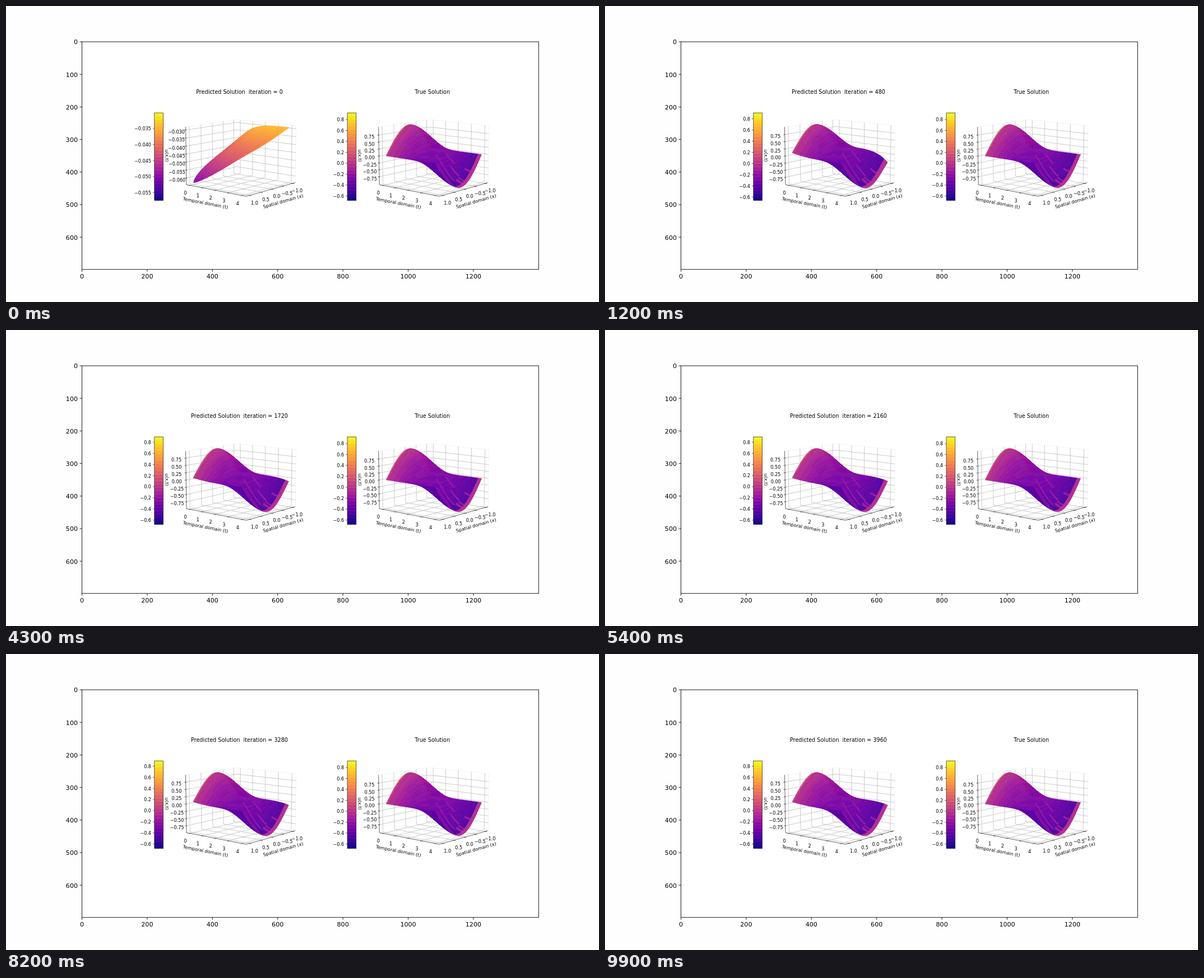
These frames come from a looping animation (1058 px wide and 529 px high, 10000 ms). An HTML page with a canvas:

```html
<!DOCTYPE html>
<html lang="en">
<head>
<meta charset="utf-8">
<title>Predicted and true solution</title>
<style>
  html, body { margin: 0; width: 100%; height: 100%; overflow: hidden; background: #fefefe; }
  canvas { display: block; width: 1058px; height: 529px; }
</style>
</head>
<body>
<canvas id="stage"></canvas>
<script>
const W = 1058, H = 529, FRAMES = 100, STEP_MS = 100, N = 48;
const canvas = document.getElementById('stage');
const ctx = canvas.getContext('2d');
const dpr = window.devicePixelRatio || 1;
canvas.width = W * dpr;
canvas.height = H * dpr;
ctx.scale(dpr, dpr);

const clamp = (v, a = 0, b = 1) => Math.min(b, Math.max(a, v));
const lerp = (a, b, k) => a + (b - a) * k;
const hash = (a, b) => { const v = Math.sin(a * 12.9898 + b * 78.233) * 43758.5453; return v - Math.floor(v); };

const plasmaStops = ['0d0887', '46039f', '7201a8', '9c179e', 'bd3786', 'd8576b', 'ed7953', 'fb9f3a', 'fdca26', 'f0f921']
  .map(h => [0, 2, 4].map(i => parseInt(h.slice(i, i + 2), 16)));
function plasma(v) {
  const p = clamp(v) * 9, i = Math.min(8, Math.floor(p));
  return `rgb(${plasmaStops[i].map((c, k) => Math.round(lerp(c, plasmaStops[i + 1][k], p - i)))})`;
}

// Perspective camera: s runs along time, q along space (1 to -1), f is height; all 0..1 inside the box.
const rad = Math.PI / 180, L = 1.143, ZL = 0.857, FOCAL = 1214, DIST = 10;
const ca = Math.cos(40 * rad), sa = Math.sin(40 * rad), ce = Math.cos(10 * rad), se = Math.sin(10 * rad);
function project(s, q, f) {
  const a = (s - 0.5) * L, b = (q - 0.5) * L, z = (f - 0.5) * ZL;
  const h = a * ca + b * sa, d = a * sa - b * ca;
  const k = FOCAL / (DIST - d * ce - z * se);
  return [419.7 + h * k, 266.6 - (z * ce - d * se) * k];
}
const INSET = 0.064;
const inset = v => INSET + v * (1 - 2 * INSET);

function line(points, color, width) {
  ctx.beginPath();
  points.forEach(([x, y]) => ctx.lineTo(x, y));
  ctx.strokeStyle = color;
  ctx.lineWidth = width;
  ctx.stroke();
}
function label(text, x, y, size, align = 'center', angle = 0) {
  ctx.save();
  ctx.translate(x, y);
  ctx.rotate(angle * rad);
  ctx.font = `${size}px "DejaVu Sans", sans-serif`;
  ctx.textAlign = align;
  ctx.fillStyle = '#000';
  ctx.fillText(text, 0, size * 0.365);
  ctx.restore();
}

function ticks(lo, hi) {
  const range = hi - lo, mag = 10 ** Math.floor(Math.log10(range / 9));
  const step = [1, 2, 2.5, 5, 10].map(m => m * mag).find(v => range / v <= 9);
  let digits = 0;
  while (Math.abs(step * 10 ** digits - Math.round(step * 10 ** digits)) > 1e-6) digits++;
  const list = [];
  for (let k = Math.ceil(lo / step); k * step <= hi; k++) {
    const v = k * step;
    list.push({ v, text: (v < 0 ? '−' : '') + Math.abs(v).toFixed(digits) });
  }
  return list;
}

const wave = (s, q) => 0.5 + 0.48 * Math.cos(Math.PI * s) * Math.sin(Math.PI * q);
function untrained(s, q) {
  const near = 0.03 + 0.63 * s ** 1.2;
  const far = 0.6 + 0.37 * (1 - (1 - s) ** 4);
  return lerp(near, far, q ** (0.6 + 0.7 * s));
}

const toneStops = [[0, 0.42], [0.12, 0.4], [0.3, 0.31], [0.5, 0.25], [0.75, 0.18], [1, 0.14]];
function waveTone(s, q, i, j) {
  if (i === 0) return 0.44 + 0.2 * Math.sin(Math.PI * q);
  if (s > 0.94) return q > 0.42 ? 0.4 : 0.28;
  const k = toneStops.findIndex(p => p[0] >= s), [s0, c0] = toneStops[k - 1], [s1, c1] = toneStops[k];
  let c = lerp(c0, c1, (s - s0) / (s1 - s0));
  if (s > 0.5 && q > 0.2 && q < 0.55) c -= 0.05 * (s - 0.5) * 2;
  if (s > 0.5 && q > 0.2 && hash(j, i >> 3) > 0.93) return 0.33;
  return c + (hash(i, Math.floor(j / 9)) - 0.5) * 0.045;
}

function surface(height, tone) {
  const grid = [];
  for (let j = 0; j <= N; j++) {
    grid.push([]);
    for (let i = 0; i <= N; i++) {
      const s = i / N, q = j / N;
      grid[j].push(project(inset(s), inset(q), height(s, q)));
    }
  }
  ctx.lineWidth = 0.5;
  for (let j = N - 1; j >= 0; j--) for (let i = 0; i < N; i++) {
    ctx.beginPath();
    for (const [x, y] of [grid[j][i], grid[j][i + 1], grid[j + 1][i + 1], grid[j + 1][i]]) ctx.lineTo(x, y);
    ctx.closePath();
    ctx.fillStyle = ctx.strokeStyle = plasma(tone((i + 0.5) / N, (j + 0.5) / N, i, j));
    ctx.fill();
    ctx.stroke();
  }
}

function box(zlo, zhi) {
  const GRID = '#c4c4c4', INK = '#222', SIZE = 8.08;
  const seg = (a, b, color = GRID, width = 0.9) => line([project(...a), project(...b)], color, width);
  const edge = (a, b) => seg(a, b, '#ececec', 0.6);
  edge([0, 0, 1], [0, 1, 1]);
  edge([0, 1, 1], [1, 1, 1]);
  edge([1, 1, 0], [1, 1, 1]);

  for (let k = 0; k <= 4; k++) {
    const p = inset(k / 4);
    line([project(p, 0, 0), project(p, 1, 0), project(p, 1, 1)], GRID, 0.9);
    line([project(1, p, 0), project(0, p, 0), project(0, p, 1)], GRID, 0.9);
  }
  const pad = (zhi - zlo) / 50;
  const zTicks = ticks(zlo + pad, zhi - pad).map(t => ({ ...t, f: (t.v - zlo) / (zhi - zlo) }));
  for (const { f } of zTicks) line([project(0, 0, f), project(0, 1, f), project(1, 1, f)], GRID, 0.9);

  line([project(0, 0, 1), project(0, 0, 0), project(1, 0, 0), project(1, 1, 0)], INK, 0.7);
  for (let k = 0; k <= 4; k++) {
    const p = inset(k / 4);
    seg([p, 0.012, 0], [p, -0.024, 0], INK, 0.7);
    seg([0.988, p, 0], [1.024, p, 0], INK, 0.7);
    const [tx, ty] = project(p, 0, 0), [xx, xy] = project(1, p, 0);
    label(String(k), tx - 8.3, ty + 14, SIZE);
    const x = 1 - k / 2;
    label((x < 0 ? '−' : '') + Math.abs(x).toFixed(1), xx + 8.5, xy + 13.2, SIZE);
  }
  for (const { f, text } of zTicks) {
    const [x, y] = project(0, 0, f);
    line([[x - 2.4, y + 0.4], [x + 1.2, y - 0.2]], INK, 0.7);
    label(text, x - 16.6, y + 3.4, SIZE);
  }
  label('Temporal domain (t)', 356, 352, SIZE, 'center', 11);
  label('Spatial domain (x)', 494.5, 348.8, SIZE, 'center', -16);
  label('u(x,t)', 287.4, 267.5, SIZE, 'center', 89.4);
}

function colorbar(lo, hi) {
  const x = 264.8, y = 191, w = 15.8, h = 156.6, bands = 26;
  for (let k = 0; k < bands; k++) {
    const top = y + h * (1 - (k + 1) / bands);
    ctx.fillStyle = plasma((k + 0.5) / bands);
    ctx.fillRect(x, top, w, h / bands + (k ? 0.4 : 0));
  }
  ctx.strokeStyle = '#222';
  ctx.lineWidth = 0.7;
  ctx.strokeRect(x, y, w, h);
  for (const { v, text } of ticks(lo, hi)) {
    const ty = y + h * (hi - v) / (hi - lo);
    line([[x - 2.8, ty], [x, ty]], '#222', 0.7);
    label(text, x - 5.8, ty + 0.4, 8.08, 'right');
  }
}

function panel(dx, title, zlim, clim, height, tone) {
  ctx.save();
  ctx.translate(dx, 0);
  label(title, 416.5, 153.2, 9.65);
  colorbar(...clim);
  box(...zlim);
  surface(height, tone);
  ctx.restore();
}

function outerAxes() {
  const x0 = 135.5, y0 = 64, unit = 0.582, INK = '#000';
  ctx.fillStyle = '#fff';
  ctx.fillRect(x0, y0, 815, 407);
  ctx.strokeStyle = INK;
  ctx.lineWidth = 0.9;
  ctx.strokeRect(x0, 64, 814.8, 406.8);
  for (let v = 0; v <= 1200; v += 200) {
    const x = x0 + v * unit;
    line([[x, 470.8], [x, 474.7]], INK, 0.9);
    label(String(v), x, 482.9, 11.1);
  }
  for (let v = 0; v <= 600; v += 100) {
    const y = y0 + v * unit;
    line([[131.6, y], [x0, y]], INK, 0.9);
    label(String(v), 128, y + 0.3, 11.1, 'right');
  }
}

function draw(n) {
  ctx.fillStyle = '#fefefe';
  ctx.fillRect(0, 0, W, H);
  outerAxes();

  const learned = 1 - (1 - clamp(n / 12)) ** 2.5;
  const rest = Math.exp(-Math.max(0, n - 12) / 12);
  const mix = (a, b) => a.map((v, k) => lerp(v, b[k], learned));
  const fitted = (s, q) => wave(s, q)
    - (0.045 + 0.095 * rest) * s ** 6 * q ** 4
    + 0.045 * rest * Math.sin(Math.PI * s) * q
    + (0.035 + 0.02 * rest) * ((1 - s) * (1 - q)) ** 4;
  const predicted = (s, q) => lerp(untrained(s, q), fitted(s, q), learned);
  const tone = (s, q, i, j) =>
    lerp(0.25 + 0.62 * untrained(s, q) + (hash(i, j >> 3) - 0.5) * 0.03, waveTone(s, q, i, j), learned);

  const zHalf = 0.99 + 0.02 * rest;
  panel(0, `Predicted Solution  iteration = ${n * 40}`,
    mix([-0.0642, -0.0281], [-zHalf, zHalf]),
    mix([-0.0575, -0.0301], [-0.68 + 0.02 * rest, 0.895 + 0.01 * rest]),
    predicted, tone);
  panel(344.2, 'True Solution', [-1.038, 1.038], [-0.682, 0.923], wave, waveTone);
}

const start = performance.now();
let shown = -1;
function tick() {
  const n = Math.floor((performance.now() - start) / STEP_MS) % FRAMES;
  if (n !== shown) draw(shown = n);
  requestAnimationFrame(tick);
}
tick();
</script>
</body>
</html>
```
